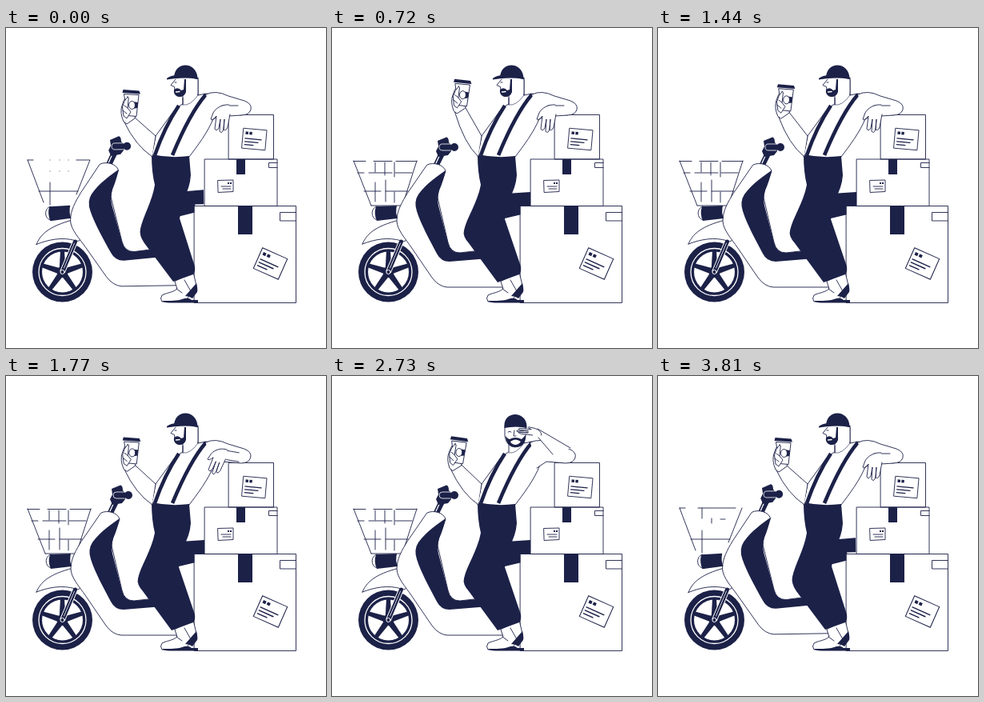
An HTML page that plays this animation: 400x400 px, repeating every 3840 ms.

```html
<!DOCTYPE html>
<html lang="en">
<head>
<meta charset="utf-8">
<title>Courier break</title>
<style>
html, body { margin: 0; width: 100%; height: 100%; overflow: hidden; background: #fff; }
svg { display: block; width: 100vw; height: 100vh; }
.o { fill: #fff; stroke: #1c2148; stroke-width: .9; stroke-linejoin: round; stroke-linecap: round; }
.l { fill: none; stroke: #1c2148; stroke-width: .9; stroke-linecap: round; stroke-linejoin: round; }
.d { fill: #1c2148; }
.w { fill: #fff; }
.g { fill: none; stroke: #fff; stroke-width: 1.3; stroke-linecap: round; }
.strap { fill: none; stroke: #1c2148; stroke-width: 4.6; }
</style>
</head>
<body>
<svg viewBox="0 0 400 400">
  <path id="basket" class="l"/>

  <g id="scooter">
    <path class="d" d="M218 207L248 205V223H237V233L216 238Z"/>
    <path class="o" d="M38 270C43 258 53 248 84 240L97 260Q92 269 87 266C70 261 54 264 38 270Z"/>
    <path class="d" d="M127 170L134 155L141 158L134 172Z"/>
    <path class="g" d="M130 169L135 158"/>
    <path class="d" d="M132 141L143 136.500Q146 137 146 143L149 146V154L145 159L133 161L130 154L133 148Z"/>
    <path class="g" style="stroke-width:.8" d="M148 145H138Q134 145 134 149Q134 153 138 153H148"/>
    <circle class="d" cx="153" cy="149" r="5"/>
    <path class="o" d="M119 171C127 167 140 171 142 179C138 192 132 202 132 212L145 268Q148 281 160 281L186 278L216 290V324H144Q133 323 125 312L99 274C93 265 81 252 81 241C81 228 88 217 94 207Z"/>
    <path class="d" d="M142 178C132 185 118 194 108 208Q102 217 106 229C111 245 122 265 131 282Q136 292 147 292L196 288L190 278L160 281Q148 281 145 268L133 222Q131 213 134 203Q139 192 142 178Z"/>
    <path class="o" d="M56 223C48 225 48 239 57 240Z"/>
    <path class="d" d="M55 223L81 222Q79 231 82 238L56 241Q52 232 55 223Z"/>
  </g>

  <g id="wheel" transform="translate(70.5 305)">
    <circle class="d" r="37.5"/>
    <circle class="g" r="29.5"/>
    <circle class="w" r="25.5"/>
    <g id="spokes"></g>
    <circle class="d" r="7"/>
    <path d="M0 0L16 -38" stroke="#fff" stroke-width="7"/>
    <path d="M0 0L16 -38" stroke="#1c2148" stroke-width="5" stroke-linecap="round"/>
    <path class="g" style="stroke-width:.8" d="M2 -5L15 -36"/>
    <circle r="2.6" class="g" style="stroke-width:1"/>
  </g>

  <g id="boxes">
    <path class="o" d="M278.5 108.5H334.5V164H278.5ZM248.5 164H339V222.5H248.5ZM235.5 222.5H362.5V343.5H235.5Z"/>
    <path class="d" d="M288 164H299V183H288ZM290 222H308V258H290Z"/>
    <path class="l" d="M339 168.5H328.5V174.5H339M362 230.5H342.5V241H362"/>
    <g id="notes"></g>
  </g>

  <path id="foot" class="o" d="M211 317L214 326C208 331 200 331 195 334Q192 338 195 342H224L238 322L234 305Z"/>
  <path class="l" d="M213 326L220 331M223 315L231 329"/>
  <path class="d" d="M195 341C206 341 214 341 220 339Q228 336 232 340H240V343.5H204Q197 343 195 341Z"/>
  <path class="d" d="M224 335L238 319Q240 326 239 330L233 338Q229 335 224 335Z"/>

  <path class="o" d="M221 83V95Q214 98 211 102L187 135L182 161Q205 166 229 161C238 149 253 130 260 111L262 84L250 82L240 84V64H221Z"/>
  <path id="pants" class="d"/>
  <path class="l" d="M221 96Q230 98 240 84" style="stroke-width:.6"/>

  <path id="foreL" class="o"/>
  <path class="w" d="M183 158L188 136L193 141L187 157Z"/>
  <path class="strap" d="M216 97Q198 124 186 159"/>
  <path class="strap" d="M250 83Q230 106 208 159"/>
  <g id="cup">
    <path class="o" d="M150 86Q147 90 145 97Q142 106 147 117L151 120L161 113Q164 105 158 96Z"/>
    <path class="o" d="M147.500 83L152 109.500L163 110.500L166 84Z"/>
    <path class="d" d="M146.500 77L166.500 78.500L168 82.500L145.500 81Z"/>
    <path class="d" d="M158 92L165 93L164 100L158 101Z"/>
    <ellipse class="o" cx="157.500" cy="96.500" rx="4" ry="5"/>
    <path class="o" d="M152 86Q147 91 145.500 99L147 110L151 113L156 105L152 100L153 90Q154 86 152 86Z"/>
    <path class="l" d="M148 97L152 100M146 103L151 107"/>
  </g>

  <g id="side">
    <path class="w" d="M212 64L206 71L211 74V84L221 87L240 82V62Z"/>
    <path class="l" d="M212 64L206 71.500L210.500 73.500L211 78M240 62V84M221 85V96M211 68L213 68"/>
    <path class="d" d="M223 64H225V80Q222 88 214 85.500Q209 83 210 77Q215 73 219 78L222 77Z"/>
    <path class="g" d="M212.500 80L217 79.500"/>
    <path id="brim" class="d" d="M201 63Q206 59 214 59L240 62V64Q222 61 201 64.500Z"/>
    <path class="d" d="M210 63C210 40 240 42 239.500 64Q226 60 210 63Z"/>
  </g>
  <g id="front">
    <path class="o" d="M216 63V75Q218 88 229 89Q241 87 242 76V63Z"/>
    <path class="d" d="M217 75Q219 78 222 79Q229 75 237 79L242 74Q242 89 230 89Q218 89 217 75Z"/>
    <path class="w" d="M223 82Q229 77 236 82Q233 86 229 86Q224 85 223 82Z"/>
    <path class="l" d="M220 70Q222 68 224 70M233 70Q235 68 237 70M228 68L227 75H230"/>
    <path class="d" d="M215.500 65C213 42 245 43 243.500 65Q230 62 215.500 65Z"/>
  </g>

  <path id="upper" class="o" d="M250 83Q262 77 278 85L298 91Q308 95 306 102Q304 109 294 109L270 107L258 115"/>
  <g id="forearm">
    <path id="foreFill" class="w"/>
    <path id="foreLines" class="l"/>
  </g>
  <g id="hand">
    <path class="o" vector-effect="non-scaling-stroke" d="M2 -4C-6 -5 -15 0 -18 6L-21 14Q-19 16 -14 10L-16 26Q-14 30 -11 25L-9 14L-10 29Q-7 33 -5 26L-4 14L-5 27Q-2 29 0 24L3 8"/>
  </g>
</svg>
<script>
const LOOP = 3840;
const el = id => document.getElementById(id);
const set = (id, name, value) => el(id).setAttribute(name, value);

// Eased value from [time, value] pairs.
function key(t, ...keys) {
  if (t <= keys[0][0]) return keys[0][1];
  for (let i = 1; i < keys.length; i++) {
    const [a, x] = keys[i - 1], [b, y] = keys[i];
    if (t < b) {
      const u = (t - a) / (b - a);
      return x + (y - x) * u * u * (3 - 2 * u);
    }
  }
  return keys[keys.length - 1][1];
}

// Blend two paths that share the same commands.
function mix(a, b, k) {
  const ends = b.match(/[\d.]+/g);
  let i = 0;
  return a.replace(/[\d.]+/g, n => (+n + (ends[i++] - n) * k).toFixed(2));
}

const note = (x, y, angle, w, h) => `<g transform="translate(${x} ${y}) rotate(${angle}) scale(${w / 30} ${h / 26})">
  <path class="o" d="M-15 -13H15V13H-15Z"/>
  <path class="d" d="M-12 -9H-8.500V-5.500H-12ZM-7 -9H-3.500V-5.500H-7Z"/>
  <path class="l" style="stroke-width:1.300" d="M-12 0H9M-12 4H5M-12 8H-1"/></g>`;
el('notes').innerHTML = note(310.500, 139, 5, 29, 25) + note(330.500, 294.500, 24, 34, 28) +
  `<path class="o" d="M265 190.500L284 190V204.500L265.500 205.500Z"/>
  <path class="d" d="M277 193H279V195H277ZM280 193H282V195H280Z"/>
  <path class="l" d="M269 198H281M271 201H281"/>`;

el('spokes').innerHTML = [0, 1, 2, 3, 4].map(i =>
  `<path class="d" transform="rotate(${i * 72})" d="M-4 0L-2.500 -27H2.500L4 0Z"/>`).join('');

const sides = 'M27 166L49 222M106 166L88 222';
const baskets = {
  dots: 'M27 165L47 218M27 165H34M88 165H105L88 208M55 165h.1M67 165h.1M78 165h.1' +
    'M55 179h.1M67 179h.1M78 179h.1M41 204H90M55 193V221',
  sparse: 'M27 165L47 218M27 165H34M50 165H97M105 165L88 208M55 165V178M67 178V184M78 179h6M41 204H90M55 193V221',
  half: 'M27 165L48 220M27 165H35M50 165H92M106 166L88 218M55 178V210M67 170V205M78 180V216' +
    'M53 178H97M33 179H41M41 205H90',
  full: sides + 'M27 166.500H84M90 166.500H105M55 168V206M66 168V206M78 166V212M35 180.500H80M41 205H92M49 222H60M66 222H86',
  broken: sides + 'M27 166.500H42M52 166.500H75M80 166.500H106M32 181H40M46 181H75M79 181H100' +
    'M54 168V180M66 168V184M78 168V186M54 193V217M67 190V217M78 205V218M40 204H61M67 204H95M49 222H88'
};
function basketLook(s) {
  if (s < .002) return 'dots';
  if (s < .15) return 'sparse';
  if (s < .75) return 'half';
  return s < .93 ? 'full' : 'broken';
}

const pants = [
  'M182 158Q205 163 229 160L231 184Q230 199 222 214L217 238L236 298Q237 305 234 308L209 317L173 269Q166 259 168 251C171 236 183 216 186 196Q182 180 182 158Z',
  'M182 158Q205 163 229 160L231 184Q230 199 221 215L216 239L236 298Q237 305 234 308L207 318L171 269Q163 260 165 253C168 238 182 218 186 196Q182 180 182 158Z'
];
const foreFill = ['M276 96L290 97L294 109L279 110Z', 'M257 66L298 90L276 98L258 77Z'];
const foreLines = ['M270 97L290 97M279 110L294 109', 'M257 66L298 90M258 77L276 98'];

function draw(t) {
  const sway = key(t, [0, 0], [360, 1], [700, 1], [1110, .88], [1500, 1], [2900, 1], [3840, 0]);
  const lift = key(t, [0, 0], [500, 1], [1080, 1], [1800, .04], [2730, .1], [3270, .05], [3840, 0]);
  const tilt = key(t, [0, 0], [500, 2], [1080, 2], [1800, 0], [2730, 3.500], [3270, 0]);
  const arm = key(t, [1640, 0], [2150, 1], [3280, 1], [3790, 0]);
  const turn = key(t, [1800, 0], [2200, 1], [2730, 1], [3270, .85], [3650, 0]);
  const drop = key(t, [2730, 0], [3200, 1]);

  set('basket', 'd', baskets[basketLook(sway)]);
  set('scooter', 'transform', `rotate(${-.9 * (1 - sway)} 70 270)`);
  set('pants', 'd', mix(pants[0], pants[1], sway));

  const dx = 5.500 * lift, dy = -13 * lift;
  set('cup', 'transform', `translate(${dx} ${dy}) rotate(${tilt} 153 110)`);
  set('foreL', 'd', `M${148 + dx} ${118 + dy}Q${162 + dx * .6} ${147 + dy * .2} 183 161L187 135L${161 + dx} ${112 + dy}`);

  const facing = turn > .5;
  set('side', 'visibility', facing ? 'hidden' : 'visible');
  set('front', 'visibility', facing ? 'visible' : 'hidden');
  set('side', 'transform', `translate(${turn * 3} 0)`);
  set('brim', 'transform', `translate(${213 * turn * 1.500} 0) scale(${1 - turn * 1.500} 1)`);
  set('front', 'transform', `translate(${(turn - 1) * 16} ${(turn - 1) * 4})`);

  const low = drop * arm * 6;
  set('upper', 'transform', `translate(${-2 * arm} 0)`);
  set('forearm', 'transform', `rotate(${-1.300 * low} 298 93)`);
  set('foreFill', 'd', mix(foreFill[0], foreFill[1], arm));
  set('foreLines', 'd', mix(foreLines[0], foreLines[1], arm));
  set('hand', 'transform',
    `translate(${277 - 19 * arm} ${100 - 27 * arm + low}) rotate(${92 * arm}) scale(${1 - .58 * arm} ${1 - .1 * arm})`);
}

function tick() {
  draw(performance.now() % LOOP);
  requestAnimationFrame(tick);
}
tick();
</script>
</body>
</html>
```
